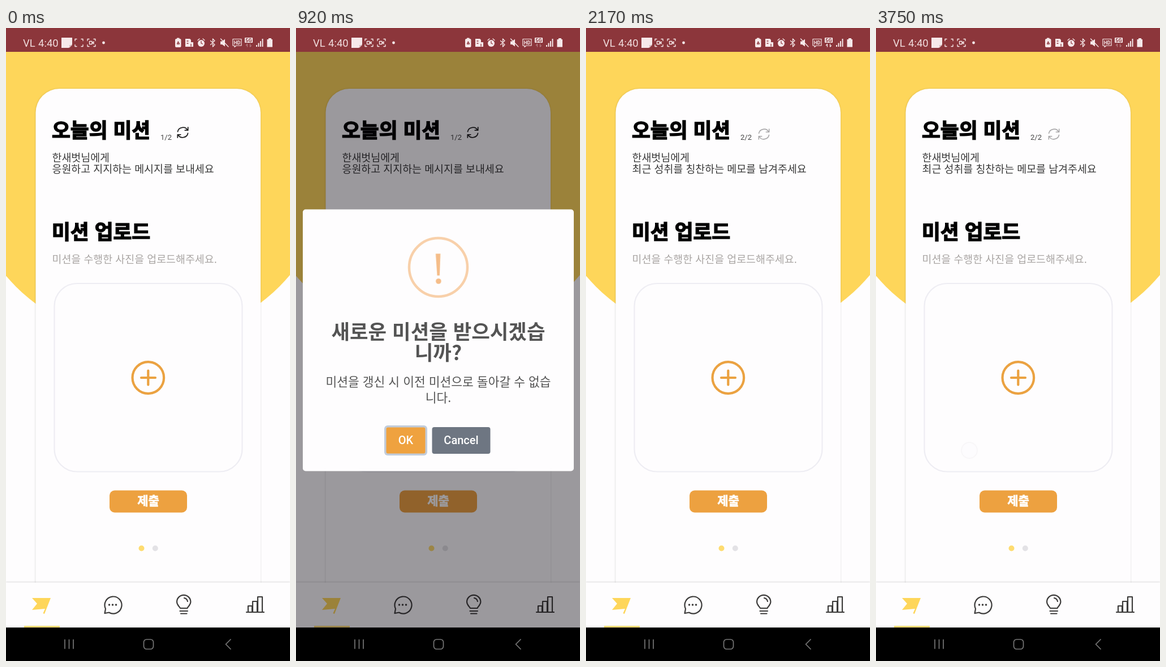
Recreate the animation shown at these times as an HTML page. Size 502x1115 px, loop 3830 ms.

```html
<!DOCTYPE html>
<html lang="ko">
<head>
<meta charset="utf-8">
<title>오늘의 미션</title>
<style>
  html, body { margin: 0; width: 502px; height: 1115px; overflow: hidden; background: #fefdfe; }
  #stage { position: relative; width: 502px; height: 1115px; overflow: hidden; }
  #stage svg, .modal { position: absolute; left: 0; top: 0; width: 502px; height: 1115px; }
  svg { font-family: "Noto Sans CJK KR", "Noto Sans CJK", "Noto Sans", sans-serif; }
  .line { fill: none; stroke-linecap: round; stroke-linejoin: round; }
  .mid { text-anchor: middle; }
  .latin { font-family: Roboto, sans-serif; }
  .head { font-size: 35.7px; font-weight: 900; stroke: #000; stroke-width: 1.5px; }
  .body { font-size: 18.4px; fill: #393939; }
  .small { font-size: 13px; fill: #444; }
  .title { font-size: 35.4px; font-weight: 700; fill: #545454; }
  .note { font-size: 21.5px; fill: #545454; }
  .btn { font: 500 20px Roboto, sans-serif; fill: #fff; }
  #shade { position: absolute; left: 0; top: 42px; width: 502px; height: 1014px; background: #07030a; opacity: 0; }
  .modal { opacity: 0; transform-origin: 251.5px 550px; }
  #askIcon { transform-origin: 251.5px 421.5px; }
  #failIcon { transform-origin: 251.5px 526px; }
  #askMark { transform-origin: 251.5px 421.5px; }
  #failMark { transform-origin: 251.5px 526px; }
  #second { opacity: 0; }
  .touch { position: absolute; width: 26px; height: 26px; margin: -15px; border-radius: 50%; opacity: 0;
    background: rgba(248,247,250,.78); border: 2px solid rgba(195,193,198,.65); box-shadow: 0 0 2px 2px rgba(255,255,255,.1); }
</style>
</head>
<body>
<div id="stage">
  <svg viewBox="0 0 502 1115">
    <defs>
      <filter id="soft" x="-10%" y="-10%" width="120%" height="120%"><feGaussianBlur stdDeviation="1.5"/></filter>
      <g id="refresh" class="line">
        <path id="half" d="M-9 -1.5C-7.5 -9.5 4.5 -11.5 8 -4.5M9.2 -9V-3.8H3.8"/>
        <use href="#half" transform="rotate(180)"/>
      </g>
      <path id="corners" class="line" d="M-7 -3.500V-6.500H-4M4 -6.500H7V-3.500M7 3.500V6.500H4M-4 6.500H-7V3.500"/>
      <path id="cam" class="line" d="M-3.5 -2.5H1V2.5H-3.5ZM1.5 0L4 -2V2Z"/>
    </defs>

    <circle cx="250.300" cy="222" r="329.700" fill="#fed65a"/>
    <path d="M52 990V149a42 42 0 0 1 42-42H408a42 42 0 0 1 42 42V990Z" fill="#00000022" filter="url(#soft)"/>
    <path d="M52.5 990V149a42 42 0 0 1 42-42H408a42 42 0 0 1 42 42V990Z" fill="#fefdfe"/>

    <text class="head" x="81" y="193">오늘의 미션</text>
    <text class="head" x="81" y="372">미션 업로드</text>
    <text class="body" x="81.500" y="234.500">한새벗님에게</text>
    <g id="first">
      <text class="small latin" x="273" y="197">1/2</text>
      <use href="#refresh" x="312.500" y="184" stroke="#222" stroke-width="1.8"/>
      <text class="body" x="81.500" y="254.500">응원하고 지지하는 메시지를 보내세요</text>
    </g>
    <g id="second">
      <text class="small latin" x="273" y="197">2/2</text>
      <use href="#refresh" x="314.500" y="187" stroke="#aaa9ab" stroke-width="1.6"/>
      <text class="body" x="81.500" y="254.500">최근 성취를 칭찬하는 메모를 남겨주세요</text>
    </g>
    <text class="body" x="81.500" y="413.500" style="fill:#aaa6a4">미션을 수행한 사진을 업로드해주세요.</text>

    <rect x="85.500" y="450" width="332" height="331.500" rx="40" fill="none" stroke="#eeedf3" stroke-width="2.2"/>
    <g class="line" stroke="#eba241" stroke-width="4.200">
      <circle cx="251.300" cy="616" r="27.800"/>
      <path d="M239 616H264M251.300 603.500V628.500"/>
    </g>
    <rect x="183" y="814.500" width="137" height="39" rx="9" fill="#eda140"/>
    <text class="mid" x="251.500" y="840" font-size="21" font-weight="900" fill="#fff" stroke="#fff" stroke-width=".7">제출</text>
    <circle cx="239.500" cy="916.500" r="5" fill="#fedc70"/>
    <circle cx="263.800" cy="916.500" r="5" fill="#e3e2e6"/>

    <rect y="974.500" width="502" height="5" fill="#00000014" filter="url(#soft)"/>
    <rect y="977" width="502" height="79" fill="#fefdfe"/>
    <path d="M46 1004H79L68 1032 65.500 1031 69 1023 46 1025 55 1014Z" fill="#fed65a"/>
    <rect x="32" y="1053" width="63" height="3" fill="#fedd78"/>
    <g class="line" stroke="#3d3c3b" stroke-width="2.200">
      <path d="M174.500 1031L176 1023A15 15 0 1 1 182 1029.500Z"/>
      <path d="M308 1022C307 1019 302 1017 302 1011A12.200 12.200 0 0 1 326.400 1011C326.400 1017 321 1019 320.500 1022ZM307.500 1027H321M309 1031.500H319.500M315 1004Q320 1005 321 1010"/>
      <path d="M425 1029H456M428 1028V1018H435V1028M436 1028V1010H444V1028M445 1028V1002H453V1028"/>
    </g>
    <path class="line" d="M182.500 1016h.01M188.500 1016h.01M194.500 1016h.01" stroke="#3d3c3b" stroke-width="3.500"/>

    <rect y="1056" width="502" height="59"/>
    <g class="line" stroke="#777" stroke-width="1.700">
      <path d="M104 1077.500V1093M111.500 1077.500V1093M119 1077.500V1093M397 1077L388.500 1085.500 397 1094"/>
      <rect x="243.500" y="1077" width="17" height="17" rx="5"/>
    </g>

    <rect width="502" height="42" fill="#8c363b"/>
    <g fill="#f6e9ea">
      <text class="latin" x="30" y="32.500" font-size="18.500" fill="#f0dcdd">VL</text>
      <text class="latin" x="57" y="32.500" font-size="18.500" fill="#f0dcdd">4:40</text>
      <path d="M98 17H117V29L111 35H98Z"/>
      <path d="M112 35V30H117Z" fill="#d9bfc1"/>
      <circle cx="172.500" cy="26" r="2.400"/>
      <rect x="299" y="19" width="10.500" height="15" rx="2"/>
      <rect x="302" y="17.500" width="4.500" height="3"/>
      <path d="M317 33V19H325L327 21V25H331V33Z"/>
      <circle cx="345" cy="27" r="6"/>
      <path d="M379 23.500H382L387 19.500V32.500L382 29H379Z"/>
      <rect x="422" y="17" width="14" height="9" rx="1"/>
      <path d="M442 33V30H444V33ZM445.500 33V26.500H447.500V33ZM449 33V23H451V33ZM452.500 33V19H454.500V33Z"/>
      <path d="M461.500 20H464V18H469V20H471V33.500H461.500Z"/>
    </g>
    <g class="line" stroke="#f6e9ea" stroke-width="1.300">
      <use href="#corners" x="129" y="26"/>
      <use href="#corners" x="151" y="26"/>
      <use href="#cam" x="151" y="26"/>
      <use href="#cam" x="129" y="26" id="blink"/>
      <path d="M339 21.500L342 19M351 21.500L348 19M361.500 22.500L369 29.500 365.500 33V19L369 22.500 361.500 29.500M379.500 19L393 33"/>
      <path d="M401 19.500H416V31H407L404 33.500V31H401Z" stroke-width="1.200"/>
      <path id="data" d="M426.500 33V28.500L424.500 30.500M431.500 28.500V33L433.500 31"/>
    </g>
    <g class="line" stroke="#8c363b" stroke-width="1.300">
      <path d="M345 23.500V27L347.500 28M302.500 28L304.300 24 306.500 28Z"/>
      <path d="M320 23H322M320 27H322M327 28.500V32"/>
    </g>
    <text class="latin mid" x="408.500" y="29" font-size="8.500" font-weight="700" fill="#f6e9ea">HD</text>
    <text class="latin mid" x="429" y="24.700" font-size="9" font-weight="700" fill="#8c363b">5G</text>
  </svg>

  <div id="shade"></div>

  <div class="modal" id="ask">
    <svg viewBox="0 0 502 1115">
      <rect x="12" y="319.500" width="479" height="461" rx="5" fill="#fefdfe"/>
      <g class="title mid">
        <text x="251.500" y="548">새로운 미션을 받으시겠습</text>
        <text x="251.500" y="585">니까?</text>
      </g>
      <g class="note mid">
        <text x="251.500" y="631">미션을 갱신 시 이전 미션으로 돌아갈 수 없습</text>
        <text x="251.500" y="659">니다.</text>
      </g>
      <rect x="156" y="700" width="76" height="53" rx="6" fill="#c2ccda"/>
      <rect x="159.500" y="703.500" width="69" height="46" rx="3" fill="#efa23f"/>
      <rect x="240.500" y="703" width="103" height="47" rx="4" fill="#6e7682"/>
      <g class="btn mid">
        <text x="194" y="733">OK</text>
        <text x="292" y="733">Cancel</text>
      </g>
    </svg>
    <svg viewBox="0 0 502 1115" id="askIcon">
      <circle cx="251.500" cy="421.500" r="51.500" fill="none" stroke="#f8d0a9" stroke-width="4.500"/>
      <g id="askMark" fill="#f5bd88">
        <path d="M247.300 397.500H255.700L253.700 436H249.300Z"/>
        <circle cx="251.500" cy="446" r="4.800"/>
      </g>
    </svg>
  </div>

  <div class="modal" id="fail">
    <svg viewBox="0 0 502 1115">
      <rect x="12" y="424" width="479" height="252.500" rx="5" fill="#fefdfe"/>
      <text class="note mid" x="251.500" y="638.500">오늘은 더이상 새로고침 할 수 없어요.</text>
    </svg>
    <svg viewBox="0 0 502 1115" id="failIcon" class="line" stroke="#f0777c">
      <circle cx="251.500" cy="526" r="51.500" stroke-width="4.500"/>
      <path id="failMark" d="M234 508L269.500 544M269.500 508L234 544" stroke-width="6"/>
    </svg>
  </div>
</div>

<script>
const LOOP = 3830, STEP = 1000 / 12;
const $ = id => document.getElementById(id);
const tracks = [];

// Queue a paused animation; the clock below scrubs it.
function move(el, start, duration, frames, easing = 'ease') {
  const keys = frames.map(f => ({ easing, ...f }));
  const a = el.animate(keys, { delay: start, duration, fill: 'forwards' });
  a.pause();
  tracks.push(a);
}

function dialog(name, open, close, mark) {
  const box = $(name);
  move($('shade'), open - 15, 100, [{ opacity: 0 }, { opacity: .4 }]);
  move(box, open, 300, [
    { transform: 'scale(.7)', opacity: 1 },
    { transform: 'scale(1.05)', opacity: 1, offset: .45 },
    { transform: 'scale(.95)', opacity: 1, offset: .8 },
    { transform: 'scale(1)', opacity: 1 }
  ]);
  move($(name + 'Icon'), open, 500, [
    { transform: 'rotateX(100deg)', opacity: 0 },
    { transform: 'rotateX(0deg)', opacity: 1 }
  ]);
  move($(name + 'Mark'), open, 500, mark);
  move($('shade'), close, 100, [{ opacity: .4 }, { opacity: 0 }]);
  move(box, close, 150, [
    { transform: 'scale(1)', opacity: 1 },
    { transform: 'scale(.5)', opacity: 0 }
  ]);
}

function tap(x, y, down, up) {
  const el = document.createElement('div');
  el.className = 'touch';
  el.style.left = x + 'px';
  el.style.top = y + 'px';
  $('stage').append(el);
  move(el, down, 40, [{ opacity: 0 }, { opacity: 1 }]);
  move(el, up, 170, [{ opacity: 1 }, { opacity: 0 }], 'linear');
}

const swing = [[45, 0], [-25, .4], [15, .8], [-5, 1], [0, 1]]
  .map(([deg, opacity]) => ({ transform: `rotate(${deg}deg)`, opacity }));
const pop = [[0, 33, .4, 0], [.5, 33, .4, 0], [.8, -8, 1.15, 1], [1, 0, 1, 1]]
  .map(([offset, y, s, opacity]) => ({ offset, opacity, transform: `translateY(${y}px) scale(${s})` }));

dialog('ask', 478, 1640, swing);
dialog('fail', 2748, 3603, pop);
move($('first'), 1825, 1, [{ opacity: 1 }, { opacity: 0 }]);
move($('second'), 1825, 1, [{ opacity: 0 }, { opacity: 1 }]);
tap(311, 184, 330, 455);
tap(195, 728, 1530, 1640);
tap(308.5, 198, 2590, 2685);
tap(165, 744, 3270, 3605);

const began = performance.now();
function draw() {
  const now = (performance.now() - began) % LOOP;
  const t = Math.floor((now + 5) / STEP) * STEP;   // twelve poses a second
  for (const a of tracks) a.currentTime = t;
  const phase = t % 1300;
  $('blink').style.opacity = phase > 365 && phase < 1010 ? 1 : 0;
  $('data').style.opacity = (t > 400 && t < 900) || (t > 1900 && t < 2500) ? 1 : .4;
  requestAnimationFrame(draw);
}
draw();
</script>
</body>
</html>
```
